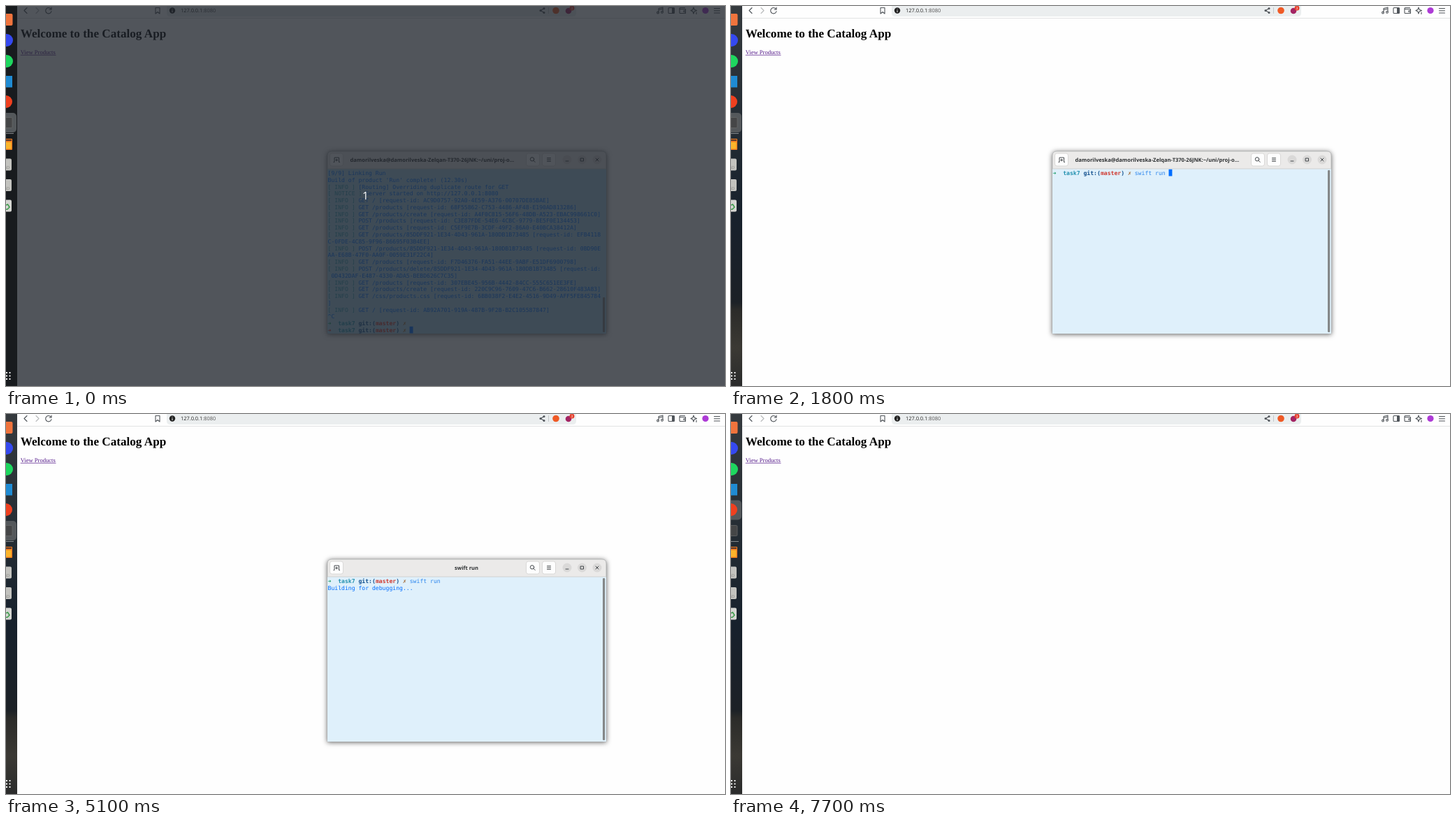
An HTML page for the animation above (8000 ms loop, 1029 by 544 pixels).

```html
<!DOCTYPE html>
<html lang="en">
<head>
<meta charset="utf-8">
<title>Server restart</title>
<style>
  html, body { margin: 0; width: 100%; height: 100%; overflow: hidden; background: #fefefe; }
  svg { display: block; width: 100vw; height: 100vh; }
  text { text-rendering: geometricPrecision; white-space: pre; }
  .serif { font-family: "Liberation Serif", serif; }
  .sans { font-family: "Open Sans", "Noto Sans", sans-serif; }
  #rows { font: 8.115px "DejaVu Sans Mono", monospace; fill: #006dff; }
  .tag { fill: #3397b3; }
  .ok { fill: #1a9c67; font-weight: bold; }
  .fail { fill: #d03a31; font-weight: bold; }
  .dir { fill: #2391b0; font-weight: bold; }
  .git { fill: #12508f; font-weight: bold; }
  .dirty { fill: #a0642d; }
  .typed { fill: #2a85ee; }
  .line { fill: none; stroke: #50555a; stroke-linecap: round; stroke-linejoin: round; }
  .button { fill: #fdfdfd; stroke: #d2d1d0; stroke-width: .8; }
  #terminal .line { stroke: #33373a; stroke-width: .9; }
  #frame { filter: drop-shadow(0 1px 3.5px rgba(0, 0, 0, .6)); }
</style>
</head>
<body>
<svg viewBox="0 0 1029 544" preserveAspectRatio="none">
  <defs>
    <linearGradient id="wallpaper" x2="0" y2="1">
      <stop offset="0" stop-color="#353a3e"/>
      <stop offset=".3" stop-color="#252d34"/>
      <stop offset=".55" stop-color="#17212c"/>
      <stop offset=".78" stop-color="#1c2126"/>
      <stop offset=".8" stop-color="#2b2b29"/>
      <stop offset=".9" stop-color="#3b3934"/>
      <stop offset="1" stop-color="#2a2b2b"/>
    </linearGradient>
    <g id="disk">
      <rect x="-8" y="-8.5" width="16" height="17" rx="2" fill="#c3c3bf"/>
      <text class="sans" x="-5" y="6" font-size="5.5" fill="#858581">SSD</text>
    </g>
  </defs>

  <g id="browser">
    <rect width="1029" height="544" fill="#fefefe"/>
    <path d="M16 17.5H1029" stroke="#e2e3e4"/>
    <path d="M230 0H816V10q0 5-5 5H235q-5 0-5-5Z" fill="#ebeeef"/>
    <g class="line" stroke-width="1.1">
      <path d="M30 2.5L26 6.500L30 10.500"/>
      <path d="M43 2.500L47 6.500L43 10.500" style="stroke:#b8babc"/>
      <path d="M64.500 4.500A4.200 4.200 0 1 0 65 7.500M65 2V5H62"/>
      <path d="M214 2.500H220V11L217 8.500L214 11Z"/>
      <path d="M770 3.500L765 6.500L770 9.500"/>
      <path d="M934 9V3.500L940 2V8M934 5.500L940 4"/>
      <circle cx="933" cy="9.500" r="1.400"/><circle cx="939" cy="8.700" r="1.400"/>
      <rect x="948" y="2.500" width="8.500" height="8" rx="1"/>
      <path d="M964 4V9.500q0 1 1 1H972.500V4.500H965q-1 0-1-1t1-1H971.500M972.500 6.500H970V8.500H972.500"/>
      <path d="M984 2L985.200 5.200L988.500 6.500L985.200 7.800L984 11L982.800 7.800L980 6.500L982.800 5.200ZM988 9V11.500"/>
      <path d="M1013.500 3.500H1021.500M1013.500 6.700H1021.500M1013.500 10H1021.500"/>
    </g>
    <g fill="#50555a">
      <circle cx="770" cy="3.500" r="1.500"/><circle cx="765" cy="6.500" r="1.500"/><circle cx="770" cy="9.500" r="1.500"/>
      <rect x="953" y="2.500" width="3.500" height="8"/>
    </g>
    <path d="M776.500 2V11" stroke="#c4c7c9"/>
    <circle cx="238" cy="6.500" r="4.200" fill="#222"/>
    <path d="M238 4V4.900M238 6V9" stroke="#eee"/>
    <circle cx="787" cy="6.500" r="4.800" fill="#ef5a26"/>
    <circle cx="805" cy="7" r="4.300" fill="#a32463"/>
    <circle cx="810" cy="3" r="3.500" fill="#e5402e"/>
    <text class="sans" x="810" y="5" font-size="5" fill="#fff" text-anchor="middle">3</text>
    <circle cx="1001" cy="6.500" r="4.600" fill="#ad3bd6"/>
    <text class="sans" x="250" y="9.200" font-size="7.400" fill="#222">127.0.0.1<tspan fill="#555">:8080</tspan></text>
    <text class="serif" x="20.700" y="45" font-size="17.150" font-weight="bold">Welcome to the Catalog App</text>
    <text class="serif" x="20.700" y="69" font-size="8.570" fill="#551a8b">View Products</text>
    <path d="M20.700 70.300H71.500" stroke="#551a8b" stroke-width=".7"/>
  </g>

  <g id="terminal">
    <path id="frame" d="M460 469V214q0-6 6-6H853q6 0 6 6V469Z" fill="#ebeae9" stroke="#a3a5a6" stroke-width=".6"/>
    <rect id="screen" x="460" y="233" width="399" height="236"/>
    <path d="M460 233H859" stroke="#cbcbca" stroke-width=".8"/>
    <rect class="button" x="463.500" y="211" width="19" height="18" rx="3"/>
    <rect class="button" x="744.500" y="211" width="19" height="18" rx="3"/>
    <rect class="button" x="767.500" y="211" width="19" height="18" rx="3"/>
    <g fill="#dad9d8">
      <circle cx="803" cy="220" r="6.500"/><circle cx="824.500" cy="220" r="6.500"/><circle cx="846" cy="220" r="6.500"/>
    </g>
    <g class="line">
      <path d="M469 223.500H470V217H476.500V223.500H477.500M473.200 219V222M471.700 220.500H474.700"/>
      <circle cx="753" cy="219.300" r="2.700"/><path d="M755 221.300L757.200 223.500"/>
      <path d="M774.500 217.700H779.500M774.500 220H779.500M774.500 222.300H779.500"/>
      <path d="M801 222H805"/><rect x="822.500" y="218" width="4" height="4"/>
      <path d="M844 218L848 222M848 218L844 222"/>
    </g>
    <text id="title" class="sans" y="222.700" font-size="7.550" font-weight="bold" fill="#2e3133"></text>
    <rect id="scrollbar" x="854" width="3.200" rx="1.200" fill="#858889"/>
    <g id="rows"></g>
    <rect id="cursor" width="4.900" height="9.700" fill="#006dff"/>
  </g>

  <g id="countdown">
    <rect width="1029" height="544" fill="#21262e" opacity=".78"/>
    <text class="sans" x="514.500" y="277.300" font-size="15.500" fill="#fff" text-anchor="middle">1</text>
  </g>

  <g id="dock">
    <rect id="dockback" width="16" height="544"/>
    <rect id="active" x="-5" width="20" height="28" rx="5" fill="#54585b"/>
    <rect x="-8" y="11" width="17.500" height="17" rx="2" fill="#f0743d"/>
    <circle cx="1" cy="49" r="9" fill="#3549f0"/>
    <circle cx="1" cy="79" r="9" fill="#1ed75f"/>
    <rect x="-8" y="100" width="17" height="16.500" fill="#1f8bd3"/>
    <circle cx="0" cy="137" r="9" fill="#ef401f"/>
    <rect x="-8" y="159.500" width="17" height="15" rx="1.500" fill="#454647" stroke="#6b6c6c" stroke-width=".7"/>
    <path d="M0 182.500H11" stroke="#a0a3a5" stroke-width=".8"/>
    <rect x="-8" y="190" width="17" height="16" rx="1" fill="#ef7d21"/>
    <path d="M0 192H8" stroke="#5a3628" stroke-width="2"/>
    <rect x="-6" y="195" width="13.500" height="9.500" fill="#fbb52b"/>
    <use href="#disk" y="227"/>
    <use href="#disk" y="256.500"/>
    <rect x="-8" y="277.500" width="16" height="17" rx="2" fill="#d5d6d2"/>
    <path d="M0 285L2.500 284L5 288L2 291H0" fill="none" stroke="#3b9b4a" stroke-width="1.500"/>
    <g stroke="#eee" stroke-width="2" stroke-dasharray="2 2.500">
      <path d="M0 525H7M0 529.500H7M0 534H7"/>
    </g>
  </g>
</svg>

<script>
const LOOP = 8000, LEFT = 460.5, TOP = 233.8, CELL = 4.885, ROW = 9.783;
const SHELL_TITLE = "damorilveska@damorilveska-Zelqan-T370-26JNK:~/uni/proj-o…";
const el = id => document.getElementById(id);
const passed = (times, t) => times.filter(time => time <= t).length;

const HISTORY = `[9/9] Linking Run
Build of product 'Run' complete! (12.30s)
[ INFO ] [Routing] Overriding duplicate route for GET
[ NOTICE ] Server started on http://127.0.0.1:8080
[ INFO ] GET / [request-id: AC9D0757-92A0-4E59-A376-00707DE85BAE]
[ INFO ] GET /products [request-id: 68F55862-C753-4486-AF48-E190AD813286]
[ INFO ] GET /products/create [request-id: A4F0C815-56F6-48DB-A523-EBAC998661C0]
[ INFO ] POST /products [request-id: C3E87FDE-54E6-4CBC-9779-8E5F0E134453]
[ INFO ] GET /products [request-id: C5EF9E7B-3CDF-49F2-86A0-E40BCA38412A]
[ INFO ] GET /products/85DDF921-1E34-4D43-961A-180DB1B73485 [request-id: EFB4118
C-0FDE-4C85-9F96-86695F03B4EE]
[ INFO ] POST /products/85DDF921-1E34-4D43-961A-180DB1B73485 [request-id: 0BD90E
AA-E68B-47F0-AA0F-0059E31F22C4]
[ INFO ] GET /products [request-id: F7D46376-FA51-44EE-9ABF-E51DF6900798]
[ INFO ] POST /products/delete/85DDF921-1E34-4D43-961A-180DB1B73485 [request-id:
 0D432DAF-E487-4330-ADA5-BEBD626C7C35]
[ INFO ] GET /products [request-id: 307EBE45-956B-4442-84CC-555C651EE3FE]
[ INFO ] GET /products/create [request-id: 220C9C96-7609-47C6-B662-28610F483A83]
[ INFO ] GET /css/products.css [request-id: 6BB038F2-E4E2-4516-9D49-AFF5FE845784
]
[ INFO ] GET / [request-id: AB92A701-919A-487B-9F2B-B2C105587847]
^C`.split("\n");

const OUTPUT = `Building for debugging...
[1/1] Write swift-version--1B52FE4B88D89ED0.txt
Build of product 'Run' complete! (0.77s)
[ INFO ] [Routing] Overriding duplicate route for GET
[ NOTICE ] Server started on http://127.0.0.1:8080`.split("\n");

// A row is a list of [column, text, class].
function logRow(text) {
  const tag = (text.match(/^\[ \w+ \]/) || [""])[0];
  return [[0, tag, "tag"], [tag.length, text.slice(tag.length), ""]];
}

function prompt(typed, status = "ok") {
  return [[0, "➜", status], [3, "task7", "dir"], [9, "git:(", "git"], [14, "master", "fail"],
    [20, ")", "git"], [22, "✗", "dirty"], [24, typed, "typed"]];
}

function terminalAt(t) {
  if (t < 900) {
    const typed = "clear".slice(0, passed([300, 500, 600, 700, 800], t));
    return { rows: [...HISTORY.map(logRow), prompt(""), prompt(typed, "fail")], cursor: [24 + typed.length, 23], on: true };
  }
  if (t < 2100) {
    const typed = ["", "clear", "swift run "][passed([1400, 1800], t)];
    return { rows: [prompt(typed)], cursor: [24 + typed.length, 0], on: true };
  }
  const shown = [0, 1, 3, 5][passed([4800, 5300, 5400], t)];
  const blinks = passed([2700, 3300, 3900, 4500, 5100, 5800, 6300, 7000, 7500], t);
  return {
    rows: [prompt("swift run "), ...OUTPUT.slice(0, shown).map(logRow)],
    cursor: [0, shown + 1],
    on: blinks % 2 === 0
  };
}

function rowMarkup(row, i) {
  const spans = row.filter(([, text]) => text).map(([col, text, kind]) =>
    `<tspan x="${LEFT + col * CELL}" class="${kind}">${text}</tspan>`);
  return `<text y="${TOP + 8.2 + i * ROW}">${spans.join("")}</text>`;
}

function set(id, attributes) {
  for (const name in attributes) el(id).setAttribute(name, attributes[name]);
}

const show = (id, visible) => set(id, { visibility: visible ? "visible" : "hidden" });

let lastMarkup;
function draw(t) {
  const counting = t < 100, open = t < 7600, running = t >= 2200;
  const { rows, cursor, on } = terminalAt(t);
  const markup = rows.map(rowMarkup).join("");
  if (markup !== lastMarkup) el("rows").innerHTML = lastMarkup = markup;

  show("countdown", counting);
  show("terminal", open);
  show("cursor", open && on);
  set("cursor", { x: LEFT - .1 + cursor[0] * CELL, y: TOP + cursor[1] * ROW });
  set("screen", { fill: counting ? "#a8d4ea" : "#dff0fb" });
  set("scrollbar", t < 900 ? { y: 417, height: 50 } : { y: 235, height: 232 });
  el("title").textContent = running ? "swift run" : SHELL_TITLE;
  set("title", running ? { x: 659, "text-anchor": "middle" } : { x: 492.5, "text-anchor": "start" });
  set("dockback", { fill: counting ? "#181b1e" : "url(#wallpaper)" });
  set("active", { y: t < 7700 ? 153 : 123.5 });
}

function tick(now) {
  draw(now % LOOP);
  requestAnimationFrame(tick);
}
draw(0);
requestAnimationFrame(tick);
</script>
</body>
</html>
```
